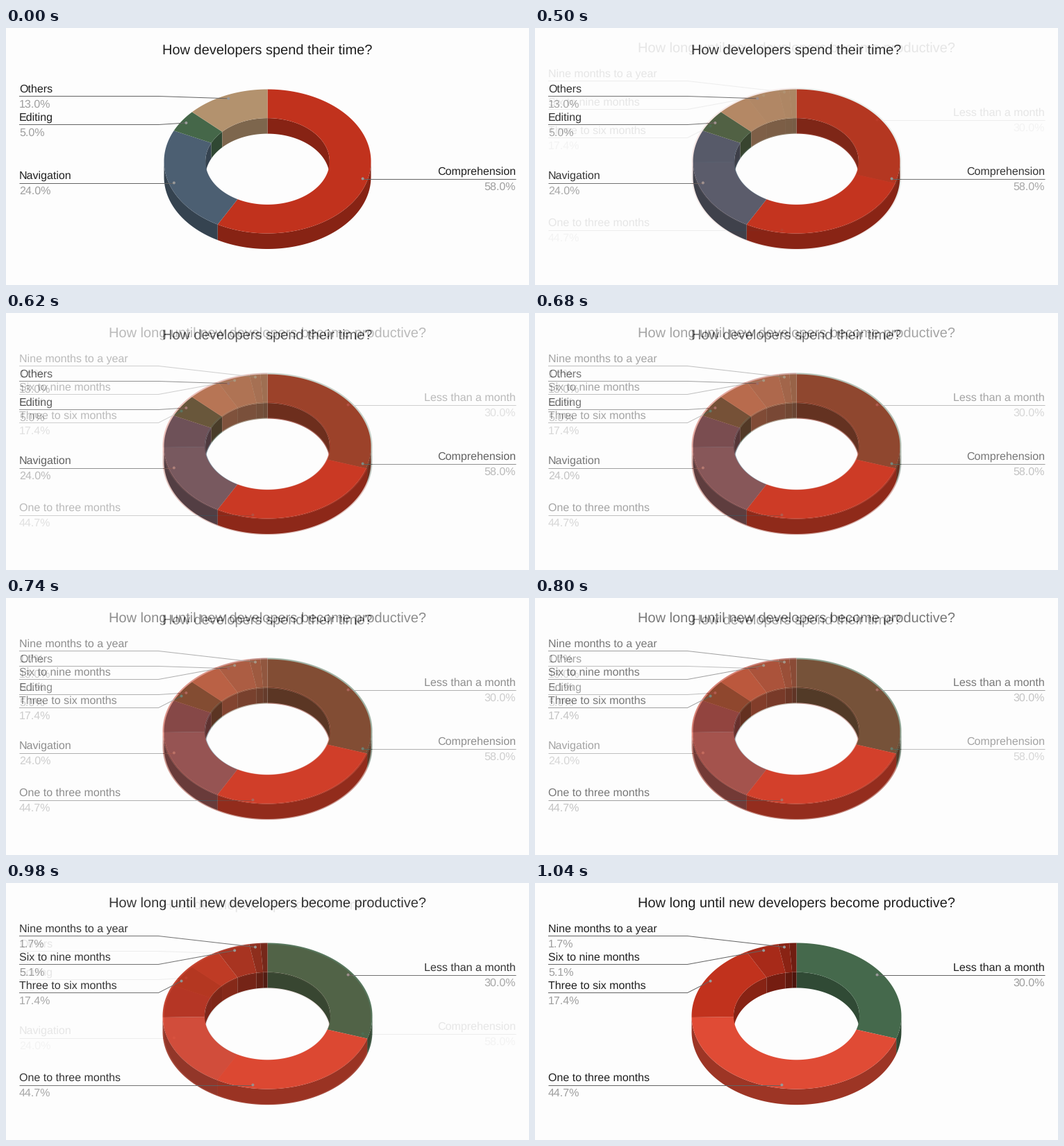
Write a matplotlib script that moves like this. It is 753 by 371 pixels and loops after 8000 ms.

```python
import matplotlib.pyplot as plt
import numpy as np
from matplotlib.animation import FuncAnimation
from matplotlib.colors import to_rgb
from matplotlib.patches import Circle, Polygon, Rectangle

W, H, DPI = 753, 371, 100
LOOP, STEP = 8000, 20
FADE_START, FADE_STEP, FADE_COUNT = 500, 60, 10
PX = 72 / DPI

BACK, INK, MUTED, LEADER = "#fdfdfd", "#1f1f1f", "#9e9e9e", "#636363"
LEFT, ELBOW, RIGHT, CX = 19, 219.5, 734, 376.5
HOLE, DOT = 0.6, 0.95

plt.rcParams["font.family"] = "Liberation Sans"
plt.rcParams["text.hinting"] = "none"

# Slices: share in percent, colour, label, height of the label line, side
TIME = dict(
    title="How developers spend their time?", base=38,
    cy=192.5, rx=149, ry=104, depth=22.5,
    slices=[
        (58.0, "#c1321d", "Comprehension", 217.5, "right"),
        (24.0, "#4c5f72", "Navigation", 223.5, "left"),
        (5.0, "#456749", "Editing", 139.5, "left"),
        (13.0, "#b3926e", "Others", 98.5, "left"),
    ])
RAMP_UP = dict(
    title="How long until new developers become productive?", base=35,
    cy=192, rx=151, ry=105.5, depth=22.7,
    slices=[
        (30.0, "#45694c", "Less than a month", 132.5, "right"),
        (44.7, "#e04b35", "One to three months", 291.5, "left"),
        (17.4, "#c1321d", "Three to six months", 158.5, "left"),
        (5.1, "#a72a19", "Six to nine months", 117.5, "left"),
        (1.7, "#8a2314", "Nine months to a year", 76.5, "left"),
        (1.1, "#701d11", None, None, None),
    ])


def new_stage(fig):
    ax = fig.add_axes([0, 0, 1, 1])
    ax.set_xlim(0, W)
    ax.set_ylim(H, 0)
    ax.axis("off")
    ax.add_patch(Rectangle((-2, -2), W + 4, H + 4, fc=BACK, lw=0, zorder=0))
    return ax


def arc(chart, start, end, scale=1.0, drop=0.0):
    """Points on the ring, in turns clockwise from the top."""
    n = max(4, int(abs(end - start) * 200))
    a = 2 * np.pi * np.linspace(start, end, n)
    x = CX + scale * chart["rx"] * np.sin(a)
    y = chart["cy"] - scale * chart["ry"] * np.cos(a) + drop
    return np.column_stack([x, y])


def fill(ax, points, color, z):
    ax.add_patch(Polygon(points, closed=True, fc=color, lw=0, zorder=z))


def wall(ax, chart, start, end, scale, color):
    if end <= start:
        return
    upper = arc(chart, start, end, scale)
    lower = arc(chart, end, start, scale, chart["depth"])
    fill(ax, np.vstack([upper, lower]), color, 1)


def draw_slice(ax, chart, start, end, color):
    shade = tuple(0.7 * c for c in to_rgb(color))
    # The far inner wall and the near outer wall are the visible ones
    wall(ax, chart, start, min(end, 0.25), HOLE, shade)
    wall(ax, chart, max(start, 0.75), end, HOLE, shade)
    wall(ax, chart, max(start, 0.25), min(end, 0.75), 1, shade)
    top = np.vstack([arc(chart, start, end), arc(chart, end, start, HOLE)])
    fill(ax, top, color, 2)


def draw_label(ax, chart, mid, share, name, y, side):
    dot = arc(chart, mid, mid, DOT)[0]
    edge = LEFT if side == "left" else RIGHT
    if abs(dot[1] - y) < 1.5:
        dot[1] = y
        xs, ys = [edge, dot[0]], [y, y]
    else:
        xs, ys = [edge, ELBOW, dot[0]], [y, y, dot[1]]
    ax.plot(xs, ys, color=LEADER, lw=PX, zorder=3, solid_capstyle="butt")
    ax.add_patch(Circle(dot, 2, fc="#999999", lw=0, zorder=4))
    style = dict(ha=side, va="baseline", fontsize=16 * PX, zorder=5)
    ax.text(edge, y - 5.5, name, color=INK, **style)
    ax.text(edge, y + 16.5, f"{share:.1f}%", color=MUTED, **style)


def draw_chart(ax, chart):
    ax.text(CX, chart["base"], chart["title"], color=INK, ha="center",
            va="baseline", fontsize=20 * PX, zorder=5)
    start = 0.0
    for share, color, name, y, side in chart["slices"]:
        end = start + share / 100
        draw_slice(ax, chart, start, end, color)
        if name:
            draw_label(ax, chart, (start + end) / 2, share, name, y, side)
        start = end


def group_opacity(alpha):
    """Filter that fades a finished layer as a whole."""
    def fade(image, dpi):
        out = image.copy()
        out[..., 3] *= alpha
        return np.round(out * 255).astype(np.uint8), 0, 0
    return fade


def blend_at(t):
    if t < FADE_START:
        return 0.0
    return min(1.0, ((t - FADE_START) // FADE_STEP + 1) / FADE_COUNT)


fig = plt.figure(figsize=(W / DPI, H / DPI), dpi=DPI, facecolor=BACK)
first, second = new_stage(fig), new_stage(fig)
draw_chart(first, TIME)
draw_chart(second, RAMP_UP)


def update(i):
    alpha = blend_at(i * STEP)
    first.set_visible(alpha < 1)
    second.set_visible(alpha > 0)
    second.set_agg_filter(group_opacity(alpha) if 0 < alpha < 1 else None)
    return first, second


anim = FuncAnimation(fig, update, frames=LOOP // STEP, interval=STEP,
                     repeat=True, repeat_delay=0, blit=False)
plt.show()
```
